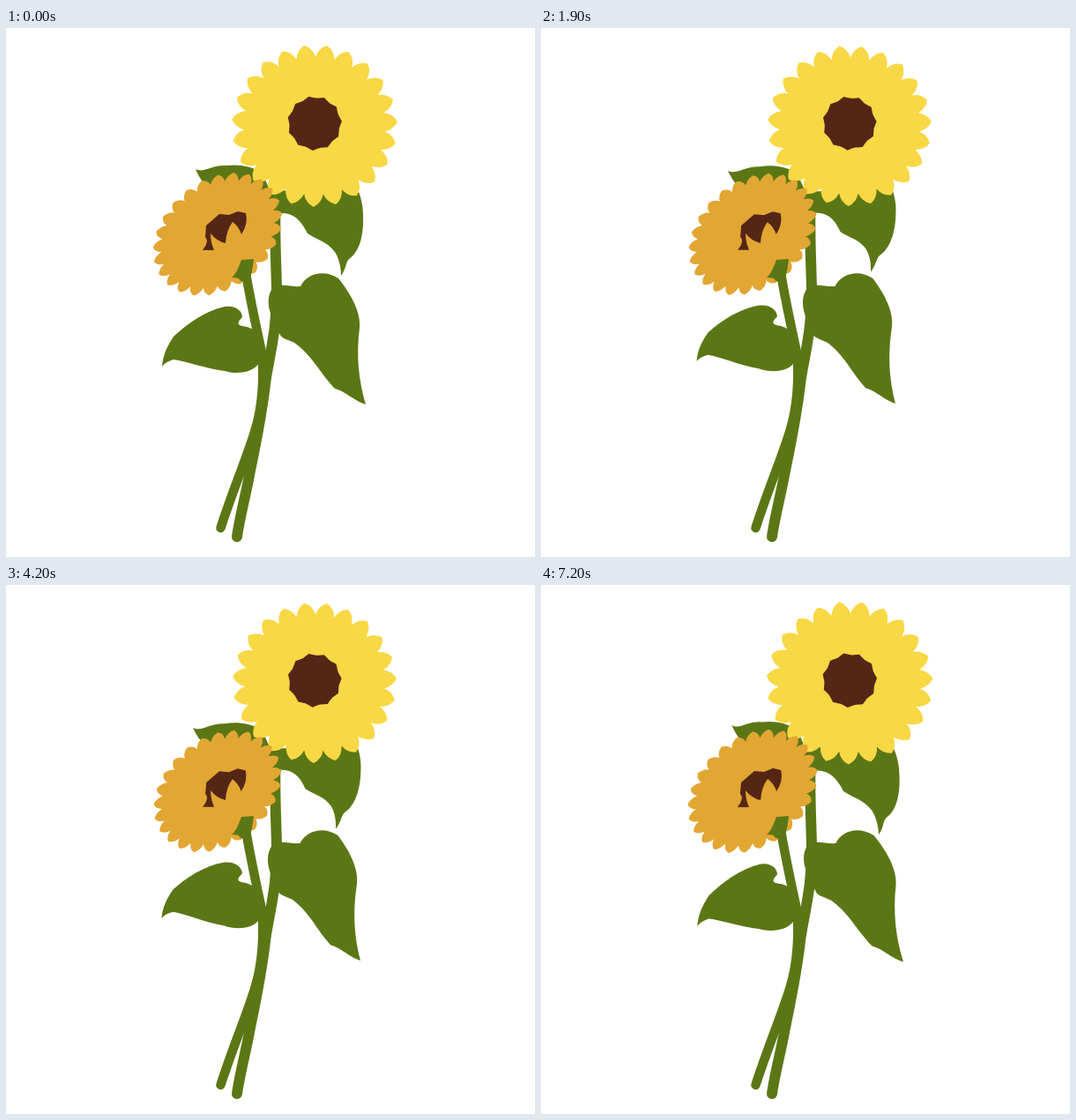
Write an HTML page with a canvas that moves like this. It is 600 by 600 pixels and loops after 7300 ms.

```html
<!DOCTYPE html>
<html lang="en">
<head>
<meta charset="utf-8">
<title>Swaying sunflowers</title>
<style>
html, body { margin: 0; width: 100%; height: 100%; overflow: hidden; background: #fff; }
canvas { display: block; }
</style>
</head>
<body>
<canvas id="stage" width="600" height="600"></canvas>
<script>
const ctx = document.getElementById('stage').getContext('2d');
const GREEN = '#5b7715', YELLOW = '#f8d845', ORANGE = '#e2a633', BROWN = '#552615';
const LOOP = 7300, FRAME = 100, SWINGS = 6, BEATS = 6;
const RAD = Math.PI / 180;

// Each leaf hangs from its base; its tip moves by shift per unit of sway.
const leaves = [
  { base: [345, 190], tip: [380, 281], shift: [6, 4.5], path:
    'M300 185 L312 210 C326 210 334 217 342 233 C354 241 364 242 373 254 C378 262 380 272 380 281 ' +
    'C386 273 385 266 389 262 C401 254 406 235 405 212 C405 200 402 190 398 181 Z' },
  { base: [300, 175], tip: [215, 160], shift: [3, -2], path:
    'M215 160 C225 165 232 155 250 156 C266 154 276 157 290 163 L304 195 L240 190 C228 182 220 172 215 160 Z' },
  { base: [345, 270], tip: [408, 427], shift: [6, 1], path:
    'M303 294 C312 289 325 294 334 293 C342 277 362 274 377 284 C390 300 403 322 401 340 ' +
    'C397 372 400 400 408 427 C395 423 385 412 373 409 C355 390 348 372 327 357 ' +
    'C316 352 312 352 310 346 C302 330 291 310 303 294 Z' },
  { base: [288, 350], tip: [177, 384], shift: [0.5, 6], path:
    'M177 384 C178 372 182 362 190 350 C205 336 225 321 248 316 C262 314 268 322 268 328 ' +
    'C262 334 262 337 268 338 C280 339 288 346 292 360 L288 378 C282 392 260 393 248 389 ' +
    'C225 386 205 378 190 376 C184 378 180 380 177 384 Z' }
].map(leaf => ({ ...leaf, path: new Path2D(leaf.path) }));

const stems = [
  { width: 12, path: 'M306 185 C304 225 306 255 307 295 C308 340 299 370 294.5 400 C290 440 284 468 277 502 C272 530 265 555 262 577' },
  { width: 10.5, path: 'M272 278 C277 308 283 335 290 368 C293 395 291 430 282 458 C272 490 256 528 243.5 567' }
].map(stem => ({ ...stem, path: new Path2D(stem.path) }));

const calyx = new Path2D('M267 263 L281 262 C280 270 279 278 276 288 L266 287 C264 282 260 284 256 283 C262 278 264 270 267 263 Z');
const smallHeart = new Path2D('M223 252 Q231 242 226 237 L227 224 L242 211 L253 212 L263 208 L272 210 ' +
  'Q275 222 267 234 Q264 225 257 220 Q250 229 249 244 Q239 242 232 233 Q232 243 236 252 Z');

// Ring of rounded teeth on a tilted ellipse; a hollow below the valley gives scallops.
function ring({ x, y, rx, ry, tilt = 0, count, start, valley, belly }) {
  const path = new Path2D(), step = 2 * Math.PI / count;
  const cos = Math.cos(tilt * RAD), sin = Math.sin(tilt * RAD);
  const at = (i, reach) => {
    const angle = start * RAD + i * step;
    const u = rx * reach * Math.cos(angle), v = ry * reach * Math.sin(angle);
    return [x + u * cos - v * sin, y + u * sin + v * cos];
  };
  path.moveTo(...at(-0.5, valley));
  for (let i = 0; i < count; i++) {
    path.quadraticCurveTo(...at(i - 0.36, belly), ...at(i, 1));
    path.quadraticCurveTo(...at(i + 0.36, belly), ...at(i + 0.5, valley));
  }
  path.closePath();
  return path;
}

const bigPetals = ring({ x: 350, y: 111, rx: 94, ry: 92, count: 23, start: 12.5, valley: 0.85, belly: 0.96 });
const bigHeart = ring({ x: 350, y: 108, rx: 31, ry: 31, count: 11, start: -4, valley: 0.92, belly: 0.93 });
const smallPetals = ring({ x: 240, y: 234, rx: 81, ry: 61, tilt: -40, count: 25, start: 0, valley: 0.87, belly: 0.97 });

function fill(path, color) {
  ctx.fillStyle = color;
  ctx.fill(path);
}

function drawLeaf({ base, tip, shift, path }, sway) {
  const ax = tip[0] - base[0], ay = tip[1] - base[1], length2 = ax * ax + ay * ay;
  const sx = shift[0] * sway / length2, sy = shift[1] * sway / length2;
  const origin = ax * base[0] + ay * base[1];
  ctx.save();
  ctx.transform(1 + sx * ax, sy * ax, sx * ay, 1 + sy * ay, -sx * origin, -sy * origin);
  fill(path, GREEN);
  ctx.restore();
}

function drawFlower(x, y, sway, layers) {
  const scale = 1 + 0.01 * sway;
  ctx.save();
  ctx.translate(x, y);
  ctx.scale(scale, scale);
  ctx.translate(-x, -y);
  layers.forEach(([path, color]) => fill(path, color));
  ctx.restore();
}

function draw(sway) {
  ctx.clearRect(0, 0, 600, 600);
  ctx.strokeStyle = GREEN;
  ctx.lineCap = 'round';
  for (const { width, path } of stems) {
    ctx.lineWidth = width;
    ctx.stroke(path);
  }
  leaves.forEach(leaf => drawLeaf(leaf, sway));
  drawFlower(350, 110, sway, [[bigPetals, YELLOW], [bigHeart, BROWN]]);
  drawFlower(240, 234, sway, [[smallPetals, ORANGE], [smallHeart, BROWN]]);
  fill(calyx, GREEN);
}

function tick() {
  const time = Math.floor(performance.now() % LOOP / FRAME) * FRAME;
  const beat = Math.floor(time / LOOP * SWINGS * BEATS + 0.4);
  draw(Math.cos((beat + 1) * 2 * Math.PI / BEATS) - 0.5);
  requestAnimationFrame(tick);
}
tick();
</script>
</body>
</html>
```
